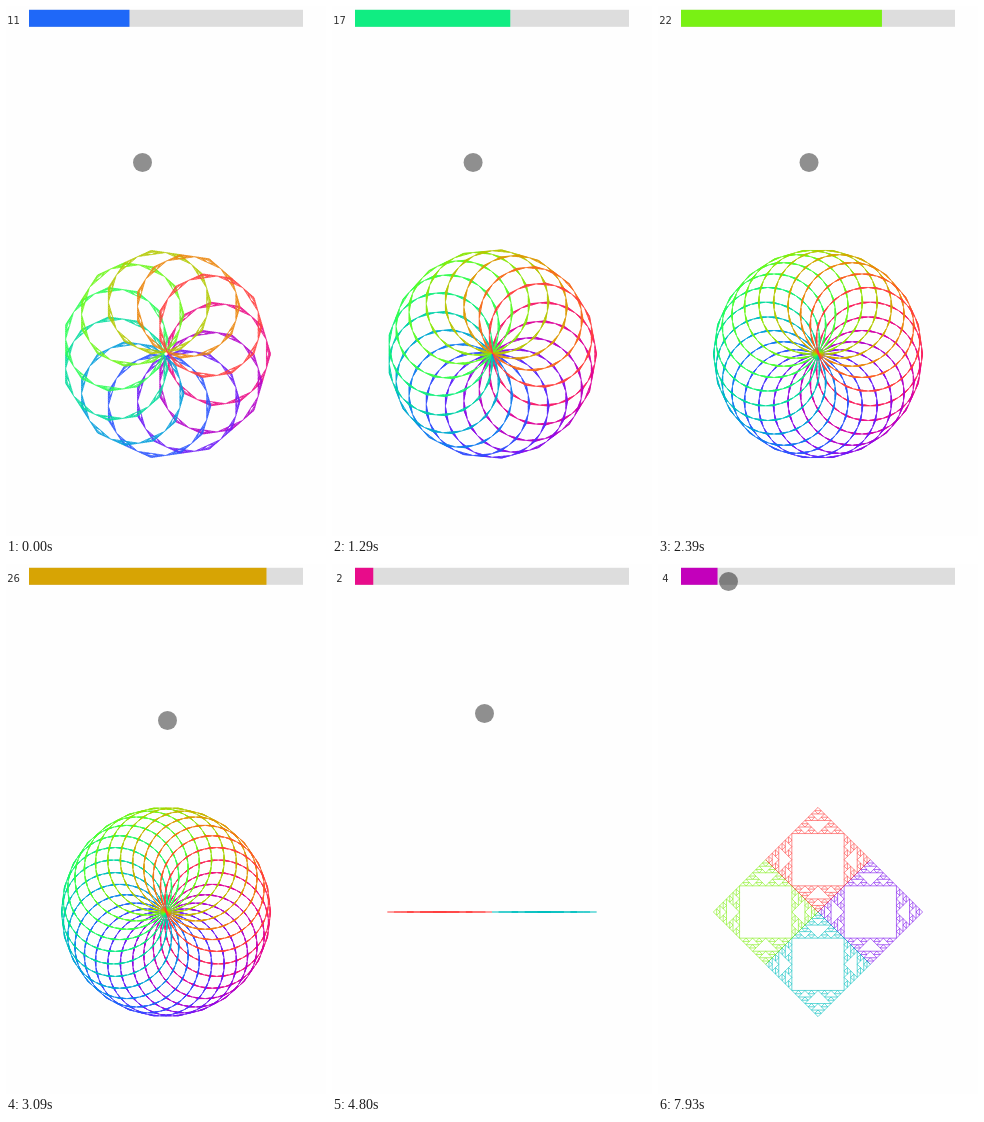
An HTML page with a canvas that plays this animation: 320 by 530 pixels, repeating every 8000 ms.

```html
<!DOCTYPE html>
<html lang="en">
<head>
<meta charset="utf-8">
<title>Polygon fractal</title>
<style>
  html, body { margin: 0; width: 100%; height: 100%; overflow: hidden; background: #fefefe; }
  canvas { display: block; width: 320px; height: 530px; }
</style>
</head>
<body>
<canvas id="stage" width="320" height="530"></canvas>
<script>
const W = 320, H = 530, LOOP = 8000, FRAME = 141, TAU = Math.PI * 2;
const CX = 160, CY = 348, R = 52.3, DEPTH = 3, MAX = 30;
const BAR = { x: 23, y: 3.8, w: 274, h: 17 };

// The counter runs steadily, is paused, then runs again briefly.
const FIRST = 11, TICK = 195, DELAY = 30, PAUSE = 4370, RESUME = 5550, EXTRA = 390;

const HOME = { x: 136.5, y: 156.5 };
const MOVES = [
  { from: 0, to: 2960, x: 161.5, y: 156.5 },
  { from: 3820, to: 4360, x: 161.5, y: 149.5 },
  { from: 4700, to: 4790, x: 152.5, y: 149.5 },
  { from: 5700, to: 6000, x: 152.5, y: 150.5 },
  { from: 6690, to: 7060, x: 64, y: 18.5 },
  { from: 7780, to: 7890, x: 70.5, y: 17.5 }
];

const ctx = document.getElementById('stage').getContext('2d');
const cache = new Map();

const clamp = (v, lo, hi) => Math.min(hi, Math.max(lo, v));
const mid = (p, q) => [(p[0] + q[0]) / 2, (p[1] + q[1]) / 2];

function sinebow(t) {
  const a = (0.5 - t) * Math.PI;
  const channel = k => Math.round(255 * Math.sin(a + k * Math.PI / 3) ** 2);
  return `rgb(${channel(0)},${channel(1)},${channel(2)})`;
}

// Leaves with the same key share a path, so overlapping leaves still build up.
function corner(a, b, c, depth, key, paths) {
  if (!depth) {
    const path = paths[key] || (paths[key] = new Path2D());
    path.moveTo(...a);
    path.lineTo(...b);
    path.lineTo(...c);
    path.closePath();
    return;
  }
  const ab = mid(a, b), bc = mid(b, c), ca = mid(c, a);
  corner(a, ab, ca, depth - 1, key * 3, paths);
  corner(b, bc, ab, depth - 1, key * 3 + 1, paths);
  corner(c, ca, bc, depth - 1, key * 3 + 2, paths);
}

// A ring of n polygons with n sides, each corner cut into nested triangles.
function fractal(n) {
  if (cache.has(n)) return cache.get(n);
  const layer = document.createElement('canvas');
  layer.width = W;
  layer.height = H;
  const g = layer.getContext('2d');
  g.lineWidth = 0.6;
  const spoke = (x, y, i) => [x + R * Math.cos(TAU * i / n), y - R * Math.sin(TAU * i / n)];
  for (let i = n - 1; n > 1 && i >= 0; i--) {
    const [x, y] = spoke(CX, CY, i + 1);
    const pts = Array.from({ length: n }, (_, j) => spoke(x, y, j));
    const paths = [];
    pts.forEach((p, j) => {
      const next = pts[(j + 1) % n], prev = pts[(j + n - 1) % n];
      corner(p, mid(p, next), mid(p, prev), DEPTH, 0, paths);
    });
    g.strokeStyle = sinebow(i / n);
    paths.forEach(path => g.stroke(path));
  }
  cache.set(n, layer);
  return layer;
}

function countAt(t) {
  const run = Math.min(t, PAUSE) + clamp(t - RESUME, 0, EXTRA);
  return (FIRST + Math.max(0, Math.floor((run - DELAY) / TICK))) % (MAX + 1);
}

function pointerAt(t) {
  return MOVES.reduce((p, m) => {
    const f = clamp((t - m.from) / (m.to - m.from), 0, 1) ** 2;
    return { x: p.x + (m.x - p.x) * f, y: p.y + (m.y - p.y) * f };
  }, HOME);
}

function draw(t) {
  const n = countAt(t);
  ctx.fillStyle = '#fefefe';
  ctx.fillRect(0, 0, W, H);

  ctx.fillStyle = '#ddd';
  ctx.fillRect(BAR.x, BAR.y, BAR.w, BAR.h);
  ctx.fillStyle = sinebow((MAX - n) / (MAX + 1));
  ctx.fillRect(BAR.x, BAR.y, BAR.w * n / MAX, BAR.h);

  ctx.fillStyle = '#333';
  ctx.font = '10px "DejaVu Sans", sans-serif';
  ctx.textAlign = 'center';
  ctx.fillText(n, 7.5, 17.5);

  ctx.drawImage(fractal(n), 0, 0);

  const { x, y } = pointerAt(t);
  ctx.fillStyle = 'rgba(0,0,0,0.435)';
  ctx.beginPath();
  ctx.arc(x, y, 9.5, 0, TAU);
  ctx.fill();
}

const start = performance.now();

function tick() {
  const t = (performance.now() - start) % LOOP;
  draw(Math.floor(t / FRAME) * FRAME);
  requestAnimationFrame(tick);
}
tick();
</script>
</body>
</html>
```
